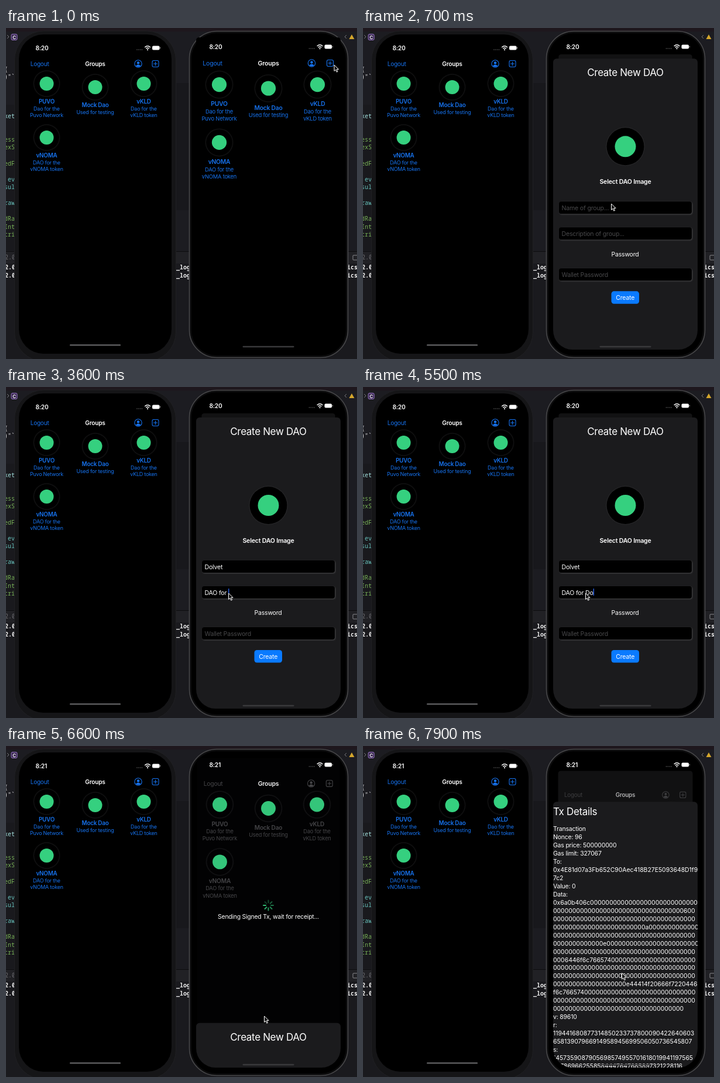
These frames come from a looping animation (600 px wide and 565 px high, 8000 ms). An HTML page:

```html
<!DOCTYPE html>
<html lang="en">
<head>
<meta charset="utf-8">
<style>
html, body { margin: 0; width: 100%; height: 100%; overflow: hidden; background: #1c1c21; }
svg { display: block; width: 600px; height: 565px; }
text { font: 10.5px Inter, Roboto, sans-serif; letter-spacing: -.02em; white-space: pre; fill: #fff; }
.b { font-weight: 600; }
.mid { text-anchor: middle; }
.num { letter-spacing: -.006em; }
.mono { font-family: "Noto Sans Mono", "DejaVu Sans Mono", monospace; font-size: 10px; letter-spacing: 0; }
.tint { fill: var(--tint); }
.line { fill: none; stroke: var(--tint); stroke-width: 1.1; stroke-linecap: round; }
.disc { filter: drop-shadow(.8px .8px 1px #3a3a3c); }
.field { fill: #000; filter: drop-shadow(1px 1px 1.2px #48484a); }
</style>
</head>
<body>
<svg id="stage" viewBox="0 0 600 565"></svg>
<script>
const BLUE = '#1673f0', GREY = '#474749', GREEN = '#35d07f';
const LOOP = 8000, OPEN = 50, CLOSE = 6378, RECEIPT = 7630;
const SHEET_TOP = 52, SCREEN_BOTTOM = 549;
const NAME = 'Dolvet', ABOUT = 'DAO for ' + NAME;

const text = (x, y, s, { size = 10.5, cls = '', fill = '', id = '' } = {}) =>
  `<text x="${x}" y="${y}" class="${cls}" ${id && `id="${id}"`} style="font-size:${size}px;${fill && 'fill:' + fill}">${s}</text>`;
const rect = (x, y, w, h, r, fill, more = '') =>
  `<rect x="${x}" y="${y}" width="${w}" height="${h}" rx="${r}" fill="${fill}" ${more}/>`;
const disc = (x, y, r, mark) =>
  `<circle class="disc" cx="${x}" cy="${y}" r="${r}"/><circle cx="${x}" cy="${y}" r="${mark}" fill="${GREEN}"/>`;

function editor() {
  const code = (x, y, s, fill, bold) =>
    `<text x="${x}" y="${y}" class="mono ${bold ? 'b' : ''}" style="fill:${fill}">${s}</text>`;
  const green = '#78b257', cyan = '#68c3bd', pale = '#d8d8da';
  const words = [[74, '{', pale], [87, ')"`', pale], [154, 'ket', '#a5e3e0'], [194, 'ess', green],
    [207, 'exS', green], [235, 'edF', green], [262, ' ev', cyan], [275, 'sul', cyan],
    [302, 'raw', cyan], [329, 'dRa', green], [343, 'Int', green], [356, 'tri', green]];
  return rect(0, 0, 600, 565, 0, '#1c1c21') + rect(0, 0, 600, 6, 0, '#1e171d')
    + rect(0, 131, 15, 249, 0, '#19191d') + rect(291, 94, 22, 217, 0, '#18181c')
    + rect(0, 381, 600, 22, 0, '#212125') + rect(0, 381, 600, 1, 0, '#0c0c0e')
    + rect(0, 402, 600, 163, 0, '#1a1a1e')
    + '<path d="M2 12l3 3-3 3M582 12l-3 3 3 3" fill="none" stroke="#77777b"/>'
    + rect(9, 10.5, 10, 10, 2, '#3b2a52', 'stroke="#9a78c8"') + text(11.3, 18.6, 'C', { size: 8, cls: 'b' })
    + '<path d="M591 11l4.5 8h-9z" fill="#d3a62c"/>'
    + words.map(([y, s, c]) => code(-3, y, s, c)).join('')
    + code(-8, 395, 'n2.0', '#6c6c70')
    + rect(593, 388, 10, 8, 1, 'none', 'stroke="#8a8a8e"')
    + [412, 425.5].map(y => code(-8, y, 'v2.0', '#eee', 1) + code(291, y, '_logs', '#eee', 1) + code(583, y, 'ics', '#eee', 1)).join('');
}

// dx, dy place the bar relative to the left-hand phone
function statusBar(dx, dy) {
  const dots = [0, 1, 2, 3].map(i => `<circle cx="${224 + i * 2.8}" cy="37" r=".8" fill="#666"/>`).join('');
  return `<g transform="translate(${dx} ${dy})">` + dots
    + '<path d="M237.2 33q4.8-4.4 9.6 0M239.2 35.2q2.8-2.5 5.6 0" fill="none" stroke="#fff" stroke-width="1.5"/>'
    + '<circle cx="242" cy="37.2" r="1.1" fill="#fff"/>'
    + rect(250, 30.5, 12.5, 7, 2, '#fff') + rect(263.2, 32.7, 1, 2.6, .5, '#aaa') + '</g>';
}

function home(cx, top, dx, k, ky, barX) {
  const y = v => top + ky * v;
  const item = (col, row, title, lines) => {
    const x = cx + col * dx, off = row * 92 + (lines.length < 2 ? 6 : 0);
    return disc(x, y(34 + off), 21.5 * k, 12 * k)
      + text(x, y(68.3 + off), title, { size: 9.8 * k, cls: 'b mid tint' })
      + lines.map((s, i) => text(x, y(79.7 + off + i * 11.6), s, { size: 8.9 * k, cls: 'mid tint' })).join('');
  };
  const [person, plus] = barX;
  return text(cx - dx * 1.335, top + 3.7, 'Logout', { size: 10 * k, cls: 'tint' })
    + text(cx, top + 3.7, 'Groups', { size: 10.1 * k, cls: 'b mid' })
    + `<g transform="translate(${person} ${top})"><circle r="6.2" class="line"/><circle cy="-1.5" r="2.2" class="tint"/>`
    + '<path d="M-4.2 3.8q4.2-4.6 8.4 0q-4.2 3.6-8.4 0" class="tint"/></g>'
    + `<g transform="translate(${plus} ${top})" class="line"><rect x="-5.5" y="-5.5" width="11" height="11" rx="2.5"/><path d="M-3 0h6M0-3v6"/></g>`
    + item(-1, 0, 'PUVO', ['Dao for the', 'Puvo Network'])
    + item(0, 0, 'Mock Dao', ['Used for testing'])
    + item(1, 0, 'vKLD', ['Dao for the', 'vKLD token'])
    + item(-1, 1, 'vNOMA', ['DAO for the', 'vNOMA token']);
}

const sheet = rect(325, SHEET_TOP, 247, 520, 6, '#1b1b1d');

function form() {
  const field = (y, id) => `<rect class="field" x="335" y="${y}" width="227" height="21" rx="4"/>`
    + text(339.5, y + 14.5, '', { size: 10.6, id });
  return sheet
    + text(448.5, 82, 'Create New DAO', { size: 17, cls: 'mid' })
    + disc(448.5, 202, 32, 18)
    + text(448.5, 266, 'Select DAO Image', { size: 10.6, cls: 'b mid' })
    + field(296, 'name') + field(340, 'about') + field(410, 'pass')
    + text(448, 389.3, 'Password', { cls: 'mid' })
    + rect(424.5, 449, 47.5, 21.5, 4.5, '#0a7aff') + text(448.2, 463.6, 'Create', { cls: 'mid' })
    + rect(0, 0, 1.3, 12, .6, '#2f6bff', 'id="caret"');
}

// Breaks a long string where the next character would no longer fit
function wrap(s) {
  const pen = document.createElement('canvas').getContext('2d');
  pen.font = '10.5px Inter, Roboto, sans-serif';
  const width = v => pen.measureText(v).width, limit = 37.97 * width('0');
  const lines = [''];
  for (const c of s) {
    if (width(lines.at(-1) + c) > limit) lines.push('');
    lines[lines.length - 1] += c;
  }
  return lines;
}

// Call data: a selector, three offsets and three length-prefixed strings
function callData() {
  const word = n => n.toString(16).padStart(64, '0');
  const str = s => word(s.length) + [...s].map(c => c.charCodeAt(0).toString(16)).join('').padEnd(64, '0');
  return '0x6a0b406c' + word(0x60) + word(0xa0) + word(0xe0) + str(NAME) + str(ABOUT) + word(0);
}

function receipt() {
  const lines = ['Transaction', 'Nonce: 96', 'Gas price: 500000000', 'Gas limit: 327067', 'To:',
    '0x4E81d07a3Fb652C90Aec418B27E5093648D1f9', '7c2', 'Value: 0', 'Data:', ...wrap(callData()), 'v: 89610', 'r:',
    '119441680877314850233737800090422640603', '65813907966914958945699506050736545807', 's:',
    '1457359087905698574955701618019941197565', '577869662558584447647685897321228116', '40218837'];
  return sheet + text(325, 75, 'Tx Details', { size: 17 })
    + lines.map((s, i) => text(325, 101.8 + i * 13.97, s, { cls: s.length > 30 ? 'num' : '' })).join('');
}

const spokes = Array.from({ length: 8 }, (_, i) =>
  `<path class="spoke" d="M0-4.5V-8.5" transform="rotate(${i * 45})"/>`).join('');

stage.innerHTML = `<defs><clipPath id="screen"><path d="M325 10h247V516a33 33 0 0 1-33 33H358a33 33 0 0 1-33-33z"/></clipPath></defs>`
  + editor()
  + rect(14.5, 5, 276, 564, 50, '#151517', 'stroke="#202023"') + rect(22, 11, 261, 545, 42, '#000')
  + text(50.5, 37.6, '8:20', { size: 10.2, cls: 'b', id: 'clockL' }) + statusBar(0, 0)
  + `<g style="--tint:${BLUE}">${home(152.5, 61, 83, 1, 1, [226, 255.5])}</g>`
  + rect(109, 540, 87, 2.6, 1.3, '#5a5a5c')
  + rect(313.5, 5.5, 271, 557, 47, '#0c0c0d', 'stroke="#48484a" stroke-width="1.6"')
  + rect(317, 9, 264, 550, 43, '#000')
  + `<g clip-path="url(#screen)"><g id="home">${rect(325, 16, 247, 533, 5, '#000')}`
  + home(448.5, 60, 84, 1.05, 1.075, [522.5, 554])
  + rect(325, 16, 247, 533, 5, '#2d2d2f', 'id="dim"') + '</g>'
  + `<g id="busy"><g transform="translate(448.5 272)" stroke="${GREEN}" stroke-width="2" stroke-linecap="round">${spokes}</g>`
  + text(448.5, 295, 'Sending Signed Tx, wait for receipt...', { size: 10.4, cls: 'mid' }) + '</g>'
  + `<g id="form">${form()}</g><g id="receipt">${receipt()}</g></g>`
  + text(347.5, 35.6, '8:20', { size: 10.2, cls: 'b', id: 'clockR' }) + statusBar(294.5, -2)
  + rect(404.5, 542.7, 88, 2.6, 1.3, '#39393b')
  + '<path id="cursor" d="M0 0V10.5L2.5 8.3 4.2 12.2 6 11.4 4.3 7.6H7.6z" fill="#111" stroke="#fff" stroke-width="1"/>';

const $ = id => document.getElementById(id);
const spring = ms => { const x = Math.max(0, ms) * .015; return 1 - (1 + x) * Math.exp(-x); };

const path = [[0, 561, 63], [100, 561, 63], [600, 424.5, 300], [900, 424.5, 300], [1150, 416.5, 304.5],
  [1900, 416.5, 304.5], [2400, 380.5, 352], [5850, 380.5, 352], [5980, 400, 416], [6180, 400, 416],
  [6320, 441.5, 461], [7150, 441.5, 461], [7600, 442.5, 387.5], [LOOP, 442.5, 387.5]];
function pointer(t) {
  const i = path.findIndex((p, n) => n && t <= p[0]);
  const [t0, x0, y0] = path[i - 1], [t1, x1, y1] = path[i];
  const u = (t - t0) / (t1 - t0), e = u * u * (3 - 2 * u);
  return `translate(${x0 + (x1 - x0) * e} ${y0 + (y1 - y0) * e})`;
}

const typed = (t, start) => Math.max(0, Math.floor((t - start) / 100) + 1);

function fill(id, value, hint) {
  $(id).textContent = value || hint;
  $(id).style.fill = value ? '#fff' : '#48484a';
}

function draw(t) {
  const up = t < CLOSE ? spring(t - OPEN) : 1 - spring(t - CLOSE);
  const up2 = spring(t - RECEIPT), p = Math.max(up, up2);
  const slide = (id, v) => {
    $(id).setAttribute('transform', `translate(0 ${(1 - v) * (SCREEN_BOTTOM - SHEET_TOP)})`);
    $(id).style.display = v > .001 ? '' : 'none';
  };
  slide('form', up);
  slide('receipt', up2);

  const s = 1 - .075 * p;
  $('home').setAttribute('transform', `translate(${448.5 * (1 - s)} ${16 + 29 * p - 16 * s}) scale(${s})`);
  $('home').style.setProperty('--tint', t < CLOSE ? BLUE : GREY);
  $('dim').setAttribute('opacity', .42 * p);

  $('busy').style.display = t >= CLOSE ? '' : 'none';
  const step = Math.floor(t / 100) + 4;
  document.querySelectorAll('.spoke').forEach((el, i) => el.style.opacity = .9 - .09 * ((step - i + 8) % 8));

  const name = NAME.slice(0, typed(t, 1200));
  const about = ABOUT.slice(0, t < 5400 ? Math.min(8, typed(t, 2800)) : 8 + typed(t, 5400));
  const pass = '•'.repeat(Math.min(8, typed(t, 5980) * 3));
  fill('name', name, 'Name of group...');
  fill('about', about, 'Description of group...');
  fill('pass', pass, 'Wallet Password');

  const [id, value, y] = t < 2400 ? ['name', name, 300] : t < 5950 ? ['about', about, 344] : ['pass', pass, 414];
  $('caret').style.display = t >= 1150 && t < 6320 ? '' : 'none';
  $('caret').setAttribute('x', 339.5 + (value ? $(id).getComputedTextLength() : 0));
  $('caret').setAttribute('y', y);

  $('clockL').textContent = $('clockR').textContent = t < 6000 ? '8:20' : '8:21';
  $('cursor').setAttribute('transform', pointer(t));
}

const begin = performance.now();
function frame() {
  draw((performance.now() - begin) % LOOP);
  requestAnimationFrame(frame);
}
frame();
</script>
</body>
</html>
```
